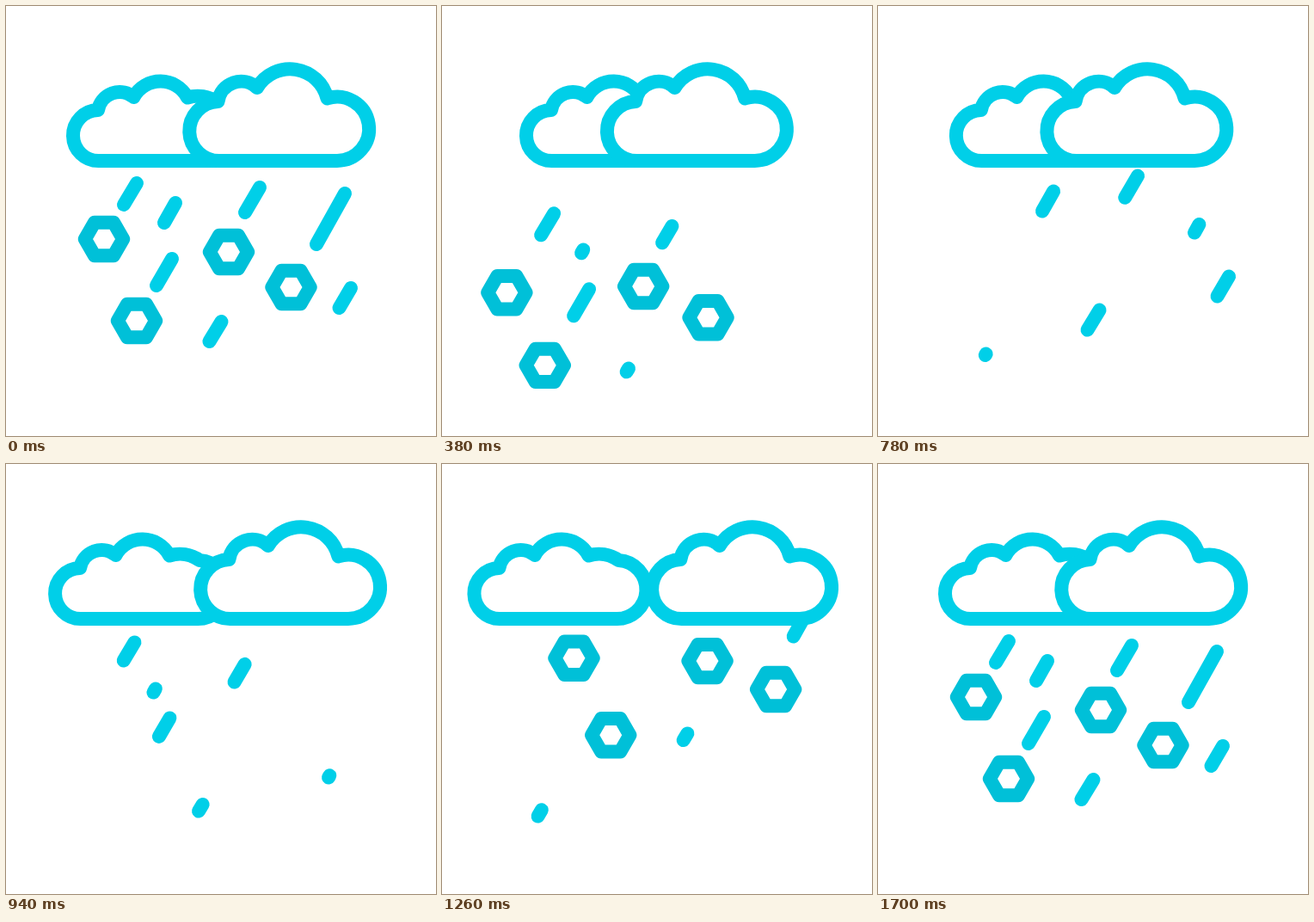
Animation of 500x500 px, one loop 2 s. Source, as an HTML page with a canvas:

```html
<!DOCTYPE html>
<html lang="en">
<head>
<meta charset="utf-8">
<title>Hail clouds</title>
<style>
  html, body { margin: 0; width: 100%; height: 100%; overflow: hidden; background: #fff; }
  canvas { display: block; width: 100vw; height: 100vh; }
</style>
</head>
<body>
<canvas id="stage" width="500" height="500"></canvas>
<script>
const ctx = document.getElementById('stage').getContext('2d');
const LOOP = 2000, STEP = 20;
const CYAN = '#00cfe8', ICE = '#00c0d8';

const ramp = (a, b, t) => Math.min(1, Math.max(0, (t - a) / (b - a)));
const ease = (a, b, t) => { const u = ramp(a, b, t); return u * u * (3 - 2 * u); };
const mix = (a, b, u) => a + (b - a) * u;

const backCloud = new Path2D('M108 180A29.5 29.5 0 0 1 107 121A25.5 25.5 0 0 1 148.5 106' +
  'A35.5 35.5 0 0 1 211 106.5A40 40 0 0 1 246 112A34 34 0 0 1 242 180Z');
const frontCloud = new Path2D('M249 180A34.5 34.5 0 0 1 246.5 111A27.3 27.3 0 0 1 292 95' +
  'A44.5 44.5 0 0 1 373.5 107.4A37.2 37.2 0 1 1 385 180Z');

// Clouds drift together, apart, and back to rest.
function drift(t, near, far) {
  if (t < 620) return near * ease(0, 620, t);
  if (t < 1140) return mix(near, far, ease(620, 1140, t));
  return far * (1 - ease(1140, 1700, t));
}

function drawCloud(path, dx) {
  ctx.save();
  ctx.translate(dx, 0);
  ctx.fillStyle = '#fff';
  ctx.strokeStyle = CYAN;
  ctx.fill(path);
  ctx.stroke(path);
  ctx.restore();
}

// Resting line, then times: first exit, second entry and exit, last entry.
const rain = [
  { line: [197, 229, 184, 252], out1: [280, 400], in2: [560, 700], out2: [850, 960], in3: [1410, 1560] },
  { line: [295, 211, 278, 240], out1: [330, 480], in2: [680, 795], out2: [900, 1040], in3: [1420, 1580] },
  { line: [394, 218, 361, 277], out1: [135, 305], in2: [485, 760], out2: [600, 815], in3: [1150, 1330] },
  { line: [250.5, 367, 236.5, 390], out1: [280, 400], in2: [560, 700], out2: [860, 980], in3: [1200, 1380] },
  { line: [401, 328, 387.5, 351], out1: [260, 380], in2: [560, 700], out2: [850, 950], in3: [1290, 1425] },
  { line: [152, 206, 137, 231], late: true, out1: [490, 620], in2: [830, 960], out2: [1020, 1135], in3: [1420, 1580] },
  { line: [193, 294, 175, 325], late: true, out1: [575, 790], in2: [850, 980], out2: [1130, 1300], in3: [1420, 1580] }
];

function rainShift(pass, late, t) {
  if (pass === 0) {
    const y = 81 * ease(60, 760, t);
    return [-0.62 * y, y];
  }
  if (pass === 1) {
    if (late) return [-33 - (t - 1100) * 0.19, 43 + (t - 1100) * 0.26];
    return [36.3 - (t - 540) * 0.122, -54 + (t - 540) * 0.169];
  }
  const y = late ? -40 * (1 - ease(1410, 1700, t)) : -65 * (1 - ease(1100, 1700, t));
  return [-0.65 * y, y];
}

function drawDrop(drop, t) {
  const pass = t < drop.in2[0] ? 0 : t < drop.in3[0] ? 1 : 2;
  const enter = [null, drop.in2, drop.in3][pass];
  const leave = [drop.out1, drop.out2, null][pass];
  const head = enter ? ramp(...enter, t) : 1;
  const tail = leave ? ramp(...leave, t) : 0;
  if (tail >= head) return;
  const [dx, dy] = rainShift(pass, drop.late, t);
  const [x1, y1, x2, y2] = drop.line;
  ctx.beginPath();
  ctx.moveTo(mix(x1, x2, tail) + dx, mix(y1, y2, tail) + dy);
  ctx.lineTo(mix(x1, x2, head) + dx, mix(y1, y2, head) + dy);
  ctx.strokeStyle = CYAN;
  ctx.stroke();
}

const hail = [
  { x: 114, y: 271, fall: [0, 480], come: [1011, 1633] },
  { x: 259, y: 286, fall: [58, 646], come: [1107, 1660] },
  { x: 331.5, y: 327, fall: [53, 703], come: [1178, 1680] },
  { x: 152, y: 366, fall: [60, 540], come: [1060, 1640] }
];

function drawHail({ x, y, fall, come }, t) {
  const falling = t < 900;
  const k = falling ? ease(...fall, t) : 1 - ease(...come, t);
  const alpha = falling ? 1 - ramp(fall[1] - 40, fall[1] + 40, t) : ramp(come[0], come[0] + 80, t);
  if (alpha <= 0) return;
  const cx = x + (falling ? -43.5 : 61) * k;
  const cy = y + (falling ? 70 : -70) * k;
  ctx.beginPath();
  for (let i = 0; i < 6; i++) {
    const a = i * Math.PI / 3;
    ctx.lineTo(cx + 22.2 * Math.cos(a), cy + 22.2 * Math.sin(a));
  }
  ctx.closePath();
  ctx.globalAlpha = alpha;
  ctx.strokeStyle = ICE;
  ctx.stroke();
  ctx.globalAlpha = 1;
}

function draw(t) {
  ctx.fillStyle = '#fff';
  ctx.fillRect(0, 0, 500, 500);
  ctx.lineWidth = 16;
  ctx.lineCap = ctx.lineJoin = 'round';
  rain.forEach(d => drawDrop(d, t));
  drawCloud(backCloud, drift(t, 30, -46));
  drawCloud(frontCloud, drift(t, -32, 35));
  hail.forEach(h => drawHail(h, t));
}

const start = performance.now();
function tick() {
  const t = (performance.now() - start) % LOOP;
  draw(Math.min(1700, Math.floor(t / STEP) * STEP));
  requestAnimationFrame(tick);
}
tick();
</script>
</body>
</html>
```
